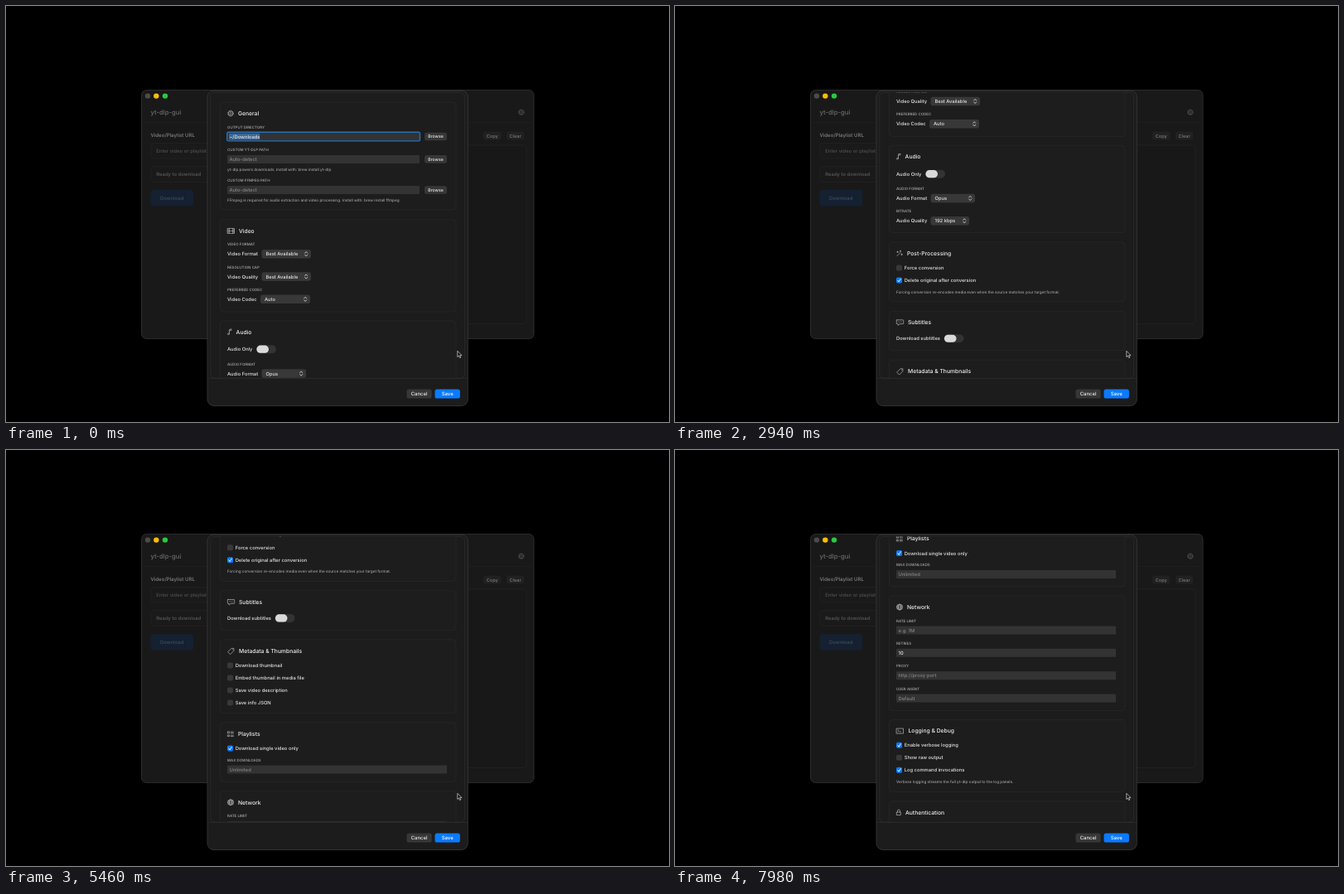
An HTML page for the animation above (8000 ms loop, 800 px wide and 502 px high).

```html
<!DOCTYPE html>
<html lang="en">
<head>
<meta charset="utf-8">
<title>Settings scroll</title>
<style>
  html, body { margin: 0; width: 100%; height: 100%; overflow: hidden; background: #000; }
  svg { display: block; width: 800px; height: 502px; }
  text { font-family: Inter, Roboto, sans-serif; font-weight: 500; text-rendering: geometricPrecision; white-space: pre; }
</style>
</head>
<body>
<svg id="stage" viewBox="0 0 800 502">
  <defs>
    <clipPath id="view"><rect x="247" y="104.5" width="306" height="344.5" rx="5"/></clipPath>
    <clipPath id="left"><rect x="164" y="102" width="79" height="299"/></clipPath>
  </defs>
  <g id="window"></g>
  <g id="sheet"></g>
  <g clip-path="url(#view)"><g id="content"></g></g>
  <g id="footer"></g>
  <path id="cursor" d="M0 0v7.2l1.7-1.5 1.2 2.6 1.2-.6-1.2-2.5h2.2z" fill="#111" stroke="#ddd" stroke-width=".7" stroke-linejoin="round"/>
</svg>
<script>
const NS = 'http://www.w3.org/2000/svg';
const $ = id => document.getElementById(id);
let layer;

function add(tag, attrs, content) {
  const el = document.createElementNS(NS, tag);
  for (const k in attrs) el.setAttribute(k, attrs[k]);
  if (content) el.textContent = content;
  layer.append(el);
  return el;
}

// Text is centred vertically on y by its cap height.
const text = (s, x, y, size = 5.8, fill = '#e4e4e4', extra = {}) =>
  add('text', { x, y: y + size * 0.36, 'font-size': size, fill, ...extra }, s);
const box = (x, y, width, height, rx, fill, stroke = 'none', extra = {}) =>
  add('rect', { x, y, width, height, rx, fill, stroke, 'stroke-width': 0.8, ...extra });
const line = (d, stroke, width = 0.8, extra = {}) =>
  add('path', { d, fill: 'none', stroke, 'stroke-width': width,
    'stroke-linecap': 'round', 'stroke-linejoin': 'round', ...extra });

function button(s, x, y, w, h, fill, color, size) {
  box(x, y - h / 2, w, h, 2.6, fill);
  text(s, x + w / 2, y, size, color, { 'text-anchor': 'middle' });
}

const caption = (s, y) => text(s, 267, y, 4.45, '#adadad', { 'font-weight': 600 });
const hint = (s, y) => text(s, 267, y, 4.65, '#a2a2a2', { 'font-weight': 400 });

function field(s, y, w = 265, color = '#858585') {
  box(267, y - 5, w, 10, 1.2, '#333');
  text(s, 269.5, y, 5.8, color, { 'font-weight': 400 });
}

function pathField(s, y) {
  field(s, y, 232);
  button('Browse', 505, y, 27, 9.6, '#373737', '#ececec', 5.2);
}

function popup(label, value, y, x, right) {
  text(label, 267, y);
  box(x, y - 5.3, right - x, 10.6, 2.8, '#383838');
  text(value, x + 5, y);
  const c = right - 5.8;
  line(`M${c - 1.5} ${y - 1}l1.5 -1.6 1.5 1.6M${c - 1.5} ${y + 1}l1.5 1.6 1.5 -1.6`, '#e4e4e4', 0.8);
}

function toggle(label, y, x) {
  text(label, 267, y);
  box(x, y - 5, 24, 10, 5, '#333');
  box(x + 0.4, y - 4.6, 14.6, 9.2, 4.6, '#dadada');
}

function check(label, y, on) {
  box(267, y - 3.5, 7, 7, 1.8, on ? '#0a7aff' : '#383838');
  if (on) line(`M268.8 ${y + 0.2}l1.3 1.6 2.2 -3.6`, '#fff', 0.9);
  text(label, 276.7, y);
}

function gear(x, y, r, color) {
  add('circle', { cx: x, cy: y, r, fill: 'none', stroke: color, 'stroke-width': 0.8 });
  add('circle', { cx: x, cy: y, r: r * 0.4, fill: 'none', stroke: color, 'stroke-width': 0.6 });
  add('circle', { cx: x, cy: y, r: r + 0.6, fill: 'none', stroke: color, 'stroke-width': 0.8, 'stroke-dasharray': '1 1.2' });
}

// Icons are drawn around (0, 0).
const icons = {
  film: 'M-4-3h8v6h-8zM-2.2-3v6M2.2-3v6M-2.2 0h4.4M-4-1h1.8M-4 1h1.8M2.2-1h1.8M2.2 1h1.8',
  note: 'M-.6 2.4v-5.4l2.6-.6v1.5l-2.6.6M-.6 2.4a1 .8 0 1 1-1-.8h1',
  wand: 'M-3 3l4-4M-2.4-2.5v1.6M-3.2-1.7h1.6M1-3.4v1.4M.3-2.7h1.4M2.6.4v1.8M1.7 1.3h1.8',
  bubble: 'M-3.6-3h7.2q.6 0 .6.6v3.6q0 .6-.6.6h-4l-2 1.8v-1.8h-1.2q-.6 0-.6-.6v-3.6q0-.6.6-.6zM-1.8-.6h.1M0-.6h.1M1.8-.6h.1',
  tag: 'M-3.6 1l4-4h3v3l-4 4zM1.8-1.5h.1',
  list: 'M-3.3-2.8h2v2h-2zM-3.3 1.4h2v1.6h-2zM.4-2.5h3M.4-1h3M.4 1.5h3M.4 3h3',
  globe: 'M-3.5 0a3.5 3.5 0 1 0 7 0a3.5 3.5 0 1 0-7 0M-1.6 0a1.6 3.5 0 1 0 3.2 0a1.6 3.5 0 1 0-3.2 0M-3.5 0h7M-3-1.8h6M-3 1.8h6',
  terminal: 'M-4-3h8v6h-8zM-2.6-1.4l1.2 1-1.2 1M-.6.8h1.6',
  lock: 'M-2.3-.4h4.6v3.6h-4.6zM-1.5-.4v-1.4a1.5 1.5 0 0 1 3 0v1.4'
};

function section(title, icon, top, bottom, x, iconX = 271) {
  box(258.5, top, 284.5, bottom - top, 4, '#1d1d1d', '#272727');
  const y = top + 13.6;
  if (icons[icon]) line(icons[icon], '#b4b4b4', 0.7, { transform: `translate(${iconX} ${y})` });
  else gear(iconX, y, 2.8, '#b4b4b4');
  text(title, x, y, 6.75, '#f0f0f0', { 'font-weight': 650 });
}

function drawWindow() {
  layer = $('window');
  box(163.5, 101.5, 473.5, 300, 6, '#191919', '#343434');
  [[171, '#4b4b4b'], [181.3, '#fdbc06'], [192, '#2ac840']].forEach(([cx, fill]) =>
    add('circle', { cx, cy: 108.6, r: 3.2, fill }));
  line('M164 140.5H636.5', '#222', 0.6);
  text('yt-dlp-gui', 174.5, 128, 7.7, '#6c6c6c', { 'font-weight': 600 });
  text('Video/Playlist URL', 174.5, 155.8, 6.1, '#858585', { 'font-weight': 600 });
  const clip = { 'clip-path': 'url(#left)' };
  box(175, 165.5, 120, 18.5, 4, '#1a1a1a', '#232323', clip);
  box(175, 193.5, 120, 19, 4, '#1a1a1a', '#232323', clip);
  text('Enter video or playlist URL', 181.3, 174.6, 5.9, '#505050', clip);
  text('Ready to download', 181.3, 203.3, 5.9, '#5c5c5c', clip);
  box(174.3, 222, 52, 19.6, 4, '#152131');
  text('Download', 200.2, 231.8, 5.9, '#3d4c60', { 'text-anchor': 'middle' });
  gear(621.8, 128.2, 2.7, '#585858');
  button('Copy', 576, 156.5, 21.5, 10, '#212121', '#787878', 5.6);
  button('Clear', 604, 156.5, 21, 10, '#212121', '#787878', 5.6);
  box(500, 168, 128, 215.5, 4, '#181818', '#242424');
}

function drawSheet() {
  layer = $('sheet');
  box(243, 102, 314.3, 380.5, 8, '#1c1c1c', '#3a3a3a');
  box(246.8, 104.3, 306.6, 344.8, 5, 'none', '#2c2c2c');
}

function drawContent() {
  layer = $('content');
  section('General', 'gear', 116, 246, 280);
  caption('OUTPUT DIRECTORY', 146.2);
  pathField('', 157.5);
  box(266.7, 152.3, 232.8, 10.6, 1.6, 'none', '#2a70b8', { 'stroke-width': 1.4 });
  box(269, 153.8, 37.2, 7.6, 0, '#41658d');
  text('~/Downloads', 269.5, 157.5, 5.8, '#e8e8e8', { 'font-weight': 400 });
  caption('CUSTOM YT-DLP PATH', 173.5);
  pathField('Auto-detect', 184.9);
  hint('yt-dlp powers downloads. Install with: brew install yt-dlp', 197);
  caption('CUSTOM FFMPEG PATH', 210.6);
  pathField('Auto-detect', 222);
  hint('FFmpeg is required for audio extraction and video processing. Install with: brew install ffmpeg', 234.2);

  section('Video', 'film', 257.8, 369, 281, 271.5);
  caption('VIDEO FORMAT', 287.8);
  popup('Video Format', 'Best Available', 299.2, 308.5, 368);
  caption('RESOLUTION CAP', 315);
  popup('Video Quality', 'Best Available', 326.5, 308.5, 368);
  caption('PREFERRED CODEC', 342.2);
  popup('Video Codec', 'Auto', 353.8, 307, 367);

  section('Audio', 'note', 379.8, 485, 277.6, 270);
  toggle('Audio Only', 414.2, 302);
  caption('AUDIO FORMAT', 432);
  popup('Audio Format', 'Opus', 443.5, 308.5, 362);
  caption('BITRATE', 459.2);
  popup('Audio Quality', '192 kbps', 470.8, 308.5, 355);

  section('Post-Processing', 'wand', 496.5, 568.3, 280);
  check('Force conversion', 527.6);
  check('Delete original after conversion', 542.6, true);
  hint('Forcing conversion re-encodes media even when the source matches your target format.', 556.6);

  section('Subtitles', 'bubble', 579.8, 627.3, 281, 271.5);
  toggle('Download subtitles', 612.8, 324.5);

  section('Metadata & Thumbnails', 'tag', 638.7, 727.5, 281, 271.5);
  ['Download thumbnail', 'Embed thumbnail in media file', 'Save video description', 'Save info JSON']
    .forEach((s, i) => check(s, 669.8 + i * 15, false));

  section('Playlists', 'list', 738.9, 810.3, 280);
  check('Download single video only', 770, true);
  caption('MAX DOWNLOADS', 784);
  field('Unlimited', 795.5);

  section('Network', 'globe', 821.5, 960, 280);
  [['RATE LIMIT', 'e.g. 1M'], ['RETRIES', '10', '#ececec'], ['PROXY', 'http://proxy:port'], ['USER AGENT', 'Default']]
    .forEach(([label, value, color], i) => {
      caption(label, 851.6 + i * 27.3);
      field(value, 863.1 + i * 27.3, 265, color);
    });

  section('Logging & Debug', 'terminal', 971, 1058, 281.5, 271.5);
  check('Enable verbose logging', 1001.9, true);
  check('Show raw output', 1016.9);
  check('Log command invocations', 1031.8, true);
  hint('Verbose logging streams the full yt-dlp output to the log panels.', 1045.8);

  section('Authentication', 'lock', 1069.3, 1140, 278, 270);
}

function drawFooter() {
  layer = $('footer');
  line('M243.5 449.3H557', '#303030', 0.7);
  button('Cancel', 483.5, 468, 30.2, 11, '#373737', '#ececec', 6);
  button('Save', 517.5, 468, 30.4, 11, '#0a7aff', '#fff', 6);
}

// Each flick: start ms, end ms, offset reached.
const flicks = [
  [770, 1780, 99.5], [1780, 3080, 212], [3150, 4060, 308.5], [4270, 5250, 408.2],
  [5430, 6370, 509.5], [6440, 7070, 572], [7280, 8050, 645.7]
];
const LOOP = 8000, STEP = 70;
const ease = u => 1 - (1 - u ** 1.5) ** 3;

function scrollAt(t) {
  let y = 0;
  for (const [start, end, to] of flicks) {
    if (t <= start) break;
    y += (to - y) * ease(Math.min(1, (t - start) / (end - start)));
  }
  return y;
}

function frame() {
  const t = Math.floor(performance.now() % LOOP / STEP) * STEP;
  $('content').setAttribute('transform', `translate(0 ${-scrollAt(t).toFixed(2)})`);
  $('cursor').setAttribute('transform', `translate(544.8 ${t < 3220 ? 416.3 : 414.3})`);
  requestAnimationFrame(frame);
}

drawWindow();
drawSheet();
drawContent();
drawFooter();
frame();
</script>
</body>
</html>
```
